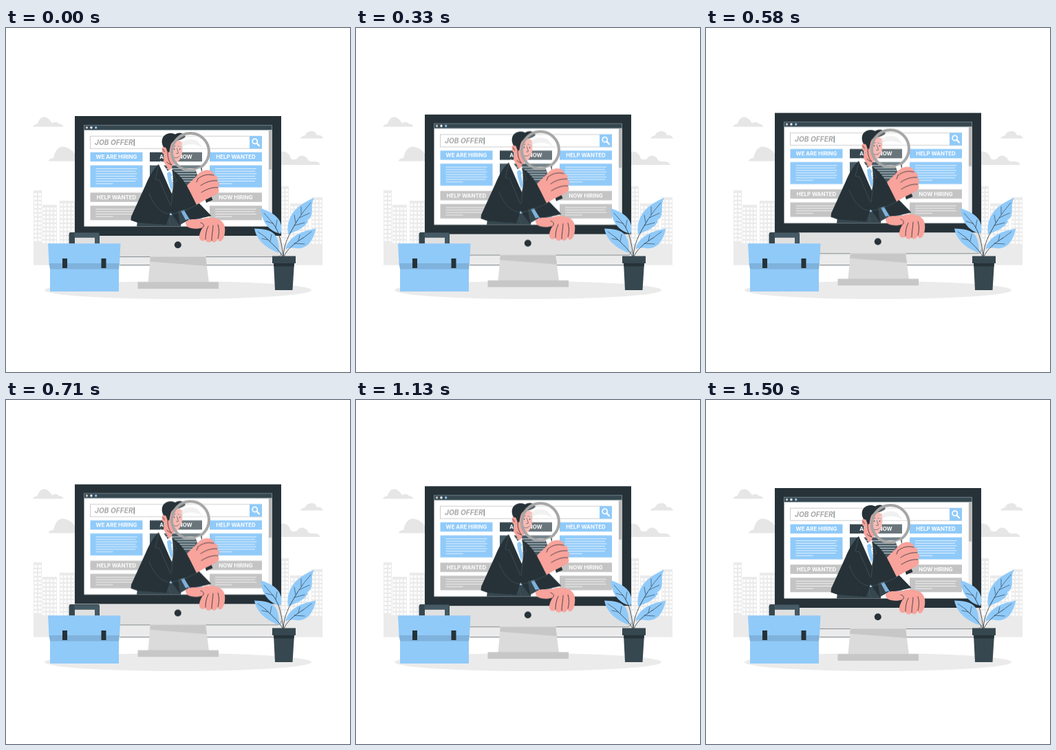
Recreate the animation shown at these times as an HTML page. Size 500 px wide and 500 px high, loop 1540 ms.

```html
<!DOCTYPE html>
<html lang="en">
<head>
<meta charset="utf-8">
<title>Job offer</title>
<style>
  html, body { margin: 0; width: 100%; height: 100%; overflow: hidden; background: #fff; }
  svg { display: block; width: 100vw; height: 100vh; }
  text { font-family: Inter, "Open Sans", sans-serif; font-weight: 700; }
  .ad { font-size: 7.900px; fill: #fff; text-anchor: middle; }
  .pale { fill: #ebebeb; }
  .cloud { fill: #e6e6e6; }
  .blue { fill: #90caf9; }
  .ink { fill: #263238; }
  .slate { fill: #37474f; }
  .skin { fill: #f8a39b; }
  .line { fill: none; stroke: #263238; stroke-width: .8; stroke-linecap: round; stroke-linejoin: round; }
  .vein { stroke-width: .6; }
  .crease { fill: none; stroke: #4d5b62; stroke-width: .6; }
</style>
</head>
<body>
<svg viewBox="0 0 500 500">
  <g class="cloud">
    <path d="M39 143.500C41 140 44 140 46 139C48 132 52 129 56 129.500C61 130 64 134 67 138.500C71 135.500 75 136.500 77 139.500C80 139.500 83 141 83 143.500Z"/>
    <path d="M62 193.500C63 190 66 189 69 189C71 179 76 172.500 82 172.500C90 173 96 177 101 184V193.500Z"/>
    <path d="M428 160.500C430 157 433 157 435 156C436 152 440 150 445 150C449 150 451 153 452 156C456 155 460 157 461 160.500Z"/>
    <path d="M398 199V180C406 178 412 182 414 190C418 192 421 191 423 190C426 184 434 184 438 190C440 195 446 194 449 194C454 194 456 197 457 199Z"/>
  </g>
  <g id="city"></g>
  <path class="line" style="stroke-width:.6" d="M166 344.700H389"/>
  <ellipse class="pale" cx="250" cy="381" rx="194" ry="13"/>

  <g id="monitor">
    <path fill="#dbdbdb" d="M210 332H290L295 370H206.500Z"/>
    <path fill="#c7c7c7" d="M210 332H290L292 346L209 339.500Z"/>
    <rect x="191.500" y="369.300" width="117.500" height="9.700" fill="#c7c7c7"/>
    <path fill="#e0e0e0" d="M100 301H400V327Q400 332.600 394 332.600H106Q100 332.600 100 327Z"/>
    <path class="line" style="stroke-width:.5" d="M100 327Q100 332.600 106 332.600H209M291 332.600H394Q400 332.600 400 327"/>
    <circle class="ink" cx="249.800" cy="315.200" r="5"/>
    <rect class="ink" x="100" y="128" width="300" height="174"/>
    <rect x="113.500" y="141.200" width="273" height="147.300" fill="#fff"/>
    <rect class="slate" x="113.500" y="141.200" width="273" height="7" stroke="#78909c" stroke-width=".6"/>
    <circle cx="117.500" cy="144.700" r="1.700" fill="#c7c7c7"/>
    <circle cx="124" cy="144.700" r="1.700" fill="#fff"/>
    <circle class="blue" cx="130.700" cy="144.700" r="1.700"/>
    <rect class="pale" x="381.500" y="148.600" width="5" height="139.900"/>
    <rect x="382" y="148.600" width="4" height="57" fill="#b8b8b8"/>

    <rect x="122.500" y="157.200" width="249" height="18" fill="#fff" stroke="#c7c7c7" stroke-width=".9"/>
    <rect class="blue" x="354" y="157" width="18" height="18.400"/>
    <circle cx="361.700" cy="164.700" r="3.600" fill="none" stroke="#fff" stroke-width="1.700"/>
    <path d="M364.500 167.500L368 171.200" stroke="#fff" stroke-width="2.200" stroke-linecap="round"/>
    <text x="129" y="170.200" font-size="10.200" font-style="italic" fill="#a8a8a8">JOB OFFER</text>
    <path d="M186.200 161.500V171.500" stroke="#455a64" stroke-width="1"/>
    <g id="ads"></g>

    <path class="slate" d="M192 272H256L254 288.500H190Z"/>
    <path class="crease" d="M228 277L225 288.500M237 277L240 288.500"/>
    <path fill="#fff" d="M225 193L221 200L232 222L240 242H243L242 206L240 202L235 208Z"/>
    <path class="skin" d="M230 186H244L241 204L237 207L229 194Z"/>
    <path class="blue" d="M234 211L238 208.500L241.500 213.500L240 216L242.500 230L240 237L235 219Z"/>
    <path class="ink" d="M222 198C214 205 208 216 203 228L182 274L181.500 279.500L191.500 283L233 286L239 268L252 286L262 270C269 267 276 263 280 257L262 228C256 218 250 211 241 206L243 214C244 224 243 232 241 241C235 228 229 213 222 198Z"/>
    <path class="slate" d="M250 266L258 264L266 279L253 286Z"/>
    <path fill="#7fb2dc" d="M254 266L261 264L268 277L261 279Z"/>
    <path class="ink" d="M259 265L279 253L298.500 273L281 277L268 280Z"/>
    <path class="crease" d="M208 240C213 254 222 267 235 270C250 271 263 264 278 257M222 199L217 220L223 221L239 258M242 207L248 222L244 225L240 258"/>

    <path class="skin" d="M233 167C238 162 248 161 256 166C257 178 256 188 251 193C247 198 243 200 240 199C235 196 232 190 231 184C226 184 225 174 229 172Z"/>
    <path class="ink" d="M229 173C225 167 226 158 232 155C237 152 243 153 246 154.500C251 151 258 152 261 158C257 162 252 163.500 245 164C240 166 239 170 237.500 180L235 181L232.500 174Z"/>
    <path class="line" d="M235 181C235 189 237 195 241 199C238 198 236 197 234 195M241.500 173L246 171.500M250 172L254 172.500M248.500 175L250.500 182L247.500 182.500M242.500 187C246 190 250 189 252 186M228 176L230.500 180"/>
    <circle class="ink" cx="244.500" cy="176" r="1"/>
    <circle class="ink" cx="252.500" cy="176" r="1"/>

    <circle cx="268" cy="180" r="27" fill="#fff" fill-opacity=".25"/>
    <path d="M249 177C252 164 266 158 278 164L286 174C272 166 260 168 249 177Z" fill="#e0e0e0" fill-opacity=".45"/>
    <circle cx="268" cy="180" r="27" fill="none" stroke="#a6a6a6" stroke-width="4"/>
    <path d="M275.500 206L282.500 203.500L287 216L280 218Z" fill="#fff" stroke="#c7c7c7" stroke-width=".5"/>
    <path class="ink" d="M280 216L286 214L300.500 250L291 254Z"/>
    <path class="skin" d="M263 229C267 224 273 220 277 215C281 209 288 206.500 293 206.500C299 207 303 210 302 214C307 214 309 218 307 222C311 225 311 229 308 232C311 236 309 240 305 242C296 247 288 250 282 254L277 257Z"/>
    <path class="line" d="M279 219C287 213 294 212 302 214M283 229C290 224 299 221 307 222M284 239C292 234 300 231 308 232M279 219L277 224"/>

    <path class="skin" d="M262 281C269 276 278 279 287 277C295 274 305 276 311 279C318 283 319 291 318 298C317 305 314 311 310 310C308 309 308 307 308 306C306 312 301 313 299 309C296 313 291 312 290 308C286 311 281 309 281 304C281 298 284 293 286 290C278 293 269 292 264 289C261 286 260 283 262 281Z"/>
    <path class="line" d="M286 290C289 287 287 284 283 283M290 307C290 300 291 294 294 288M299 309C299 301 301 293 301 287M308 306C310 299 310 292 308 286"/>
  </g>

  <path class="slate" d="M94 297H134Q136 297 136 300V313.500H129V304.500H100V313.500H91.500V300Q91.500 297 94 297Z"/>
  <path fill="#455a64" d="M99 298H135V313H129V304.500H100Z"/>
  <path class="blue" d="M61 313.300H166.500L165 342H164V383H64V342H62.500Z"/>
  <path fill="#7fb2dc" d="M62.500 342H165L164 350.500H64Z"/>
  <path class="ink" d="M82 335H89V349H82ZM138.500 335H145.500V349H138.500Z"/>

  <g class="blue">
    <path d="M410 300C407 280 416 259 448 247C442 257 447 265 443 275C441 278 436 279 439 281C434 291 422 295 410 300Z"/>
    <path d="M406 322C410 306 424 296 450.500 291.500C447 305 442 318 428 320C420 321 413 317 406 322Z"/>
    <path d="M399 299C385 296 372 285 370 262C385 267 398 274 400 287C401 292 400 296 399 299Z"/>
    <path d="M397 327C383 322 365 312 361 291.500C372 292 385 292 392 302C396 309 397 319 397 327Z"/>
  </g>
  <path class="line" d="M403 332C400 312 399 299 388 284M403 332C404 314 410 302 424 279M404 332C408 322 419 313 432 305M402 332C397 322 388 315 377 304"/>
  <path class="line vein" d="M424 279Q433 265 443 254M419 287L434 283M426 276L441 269M421 283L419 272M429 271L429 260M432 305L444 296M419 313L434 314M425 309L427 301M388 284L375 269M392 290L394 279M388 284L378 281M377 304L366 296M384 310L386 300M381 308L372 306"/>
  <path class="slate" d="M389 341H419L416.500 381H391Z"/>
  <path class="ink" d="M389 341H419L418.500 346.500H389.500Z"/>
  <rect class="slate" x="387" y="331.500" width="34" height="10.500"/>
</svg>
<script>
const $ = id => document.getElementById(id);
const rect = (x, y, w, h, fill) => `<rect x="${x}" y="${y}" width="${w}" height="${h}" fill="${fill}"/>`;

// skyline: x, top, width
const towers = [[40, 236, 12], [53, 257, 21], [78, 251, 22], [400, 230, 11], [413, 255, 27], [444, 246, 16]];
let city = rect(40, 313, 420, 31.700, '#ebebeb');
for (const [x, top, w] of towers) {
  city += rect(x, top, w, 80, '#ebebeb');
  const cols = Math.floor(w / 5), gap = w / cols;
  for (let y = top + 4; y < 311; y += 6)
    for (let c = 0; c < cols; c++) city += rect(x + c * gap + 1, y, gap - 2, 3.600, '#fff');
}
$('city').innerHTML = city;

function ad(x, y, h, label, head, body) {
  let s = rect(x, y, 76, 13.500, head) + rect(x, y + 19, 76, h, body);
  s += `<text class="ad" x="${x + 38}" y="${y + 9.600}">${label}</text>`;
  const rows = Math.floor((h - 4) / 3.600);
  for (let i = 0; i < rows; i++) {
    const end = x + (i === rows - 1 ? 33 : 68 - i % 2 * 2), ly = y + 24 + i * 3.600;
    s += `<path d="M${x + 8} ${ly}H${end}" stroke="#fff" stroke-width=".75"/>`;
  }
  return s;
}
const blue = '#90caf9', grey = '#c4c4c4', dark = '#455a64';
$('ads').innerHTML =
  ad(122.500, 180.600, 32, 'WE ARE HIRING', blue, blue) +
  ad(209, 180.600, 32, 'APPLY NOW', '#37474f', dark) +
  ad(296, 180.600, 32, 'HELP WANTED', blue, blue) +
  ad(122.500, 239.300, 21, 'HELP WANTED', grey, grey) +
  ad(209, 239.300, 21, 'JOIN US', blue, blue) +
  ad(296, 239.300, 21, 'NOW HIRING', grey, grey);

const lift = y => `translateY(${y}px)`;
const easing = 'cubic-bezier(.3, .15, .7, .85)';
$('monitor').animate([
  { offset: 0, transform: lift(0), easing },
  { offset: .485, transform: lift(-5.800), easing },
  { offset: .975, transform: lift(0) },
  { offset: 1, transform: lift(0) }
], { duration: 1540, iterations: Infinity });
</script>
</body>
</html>
```
